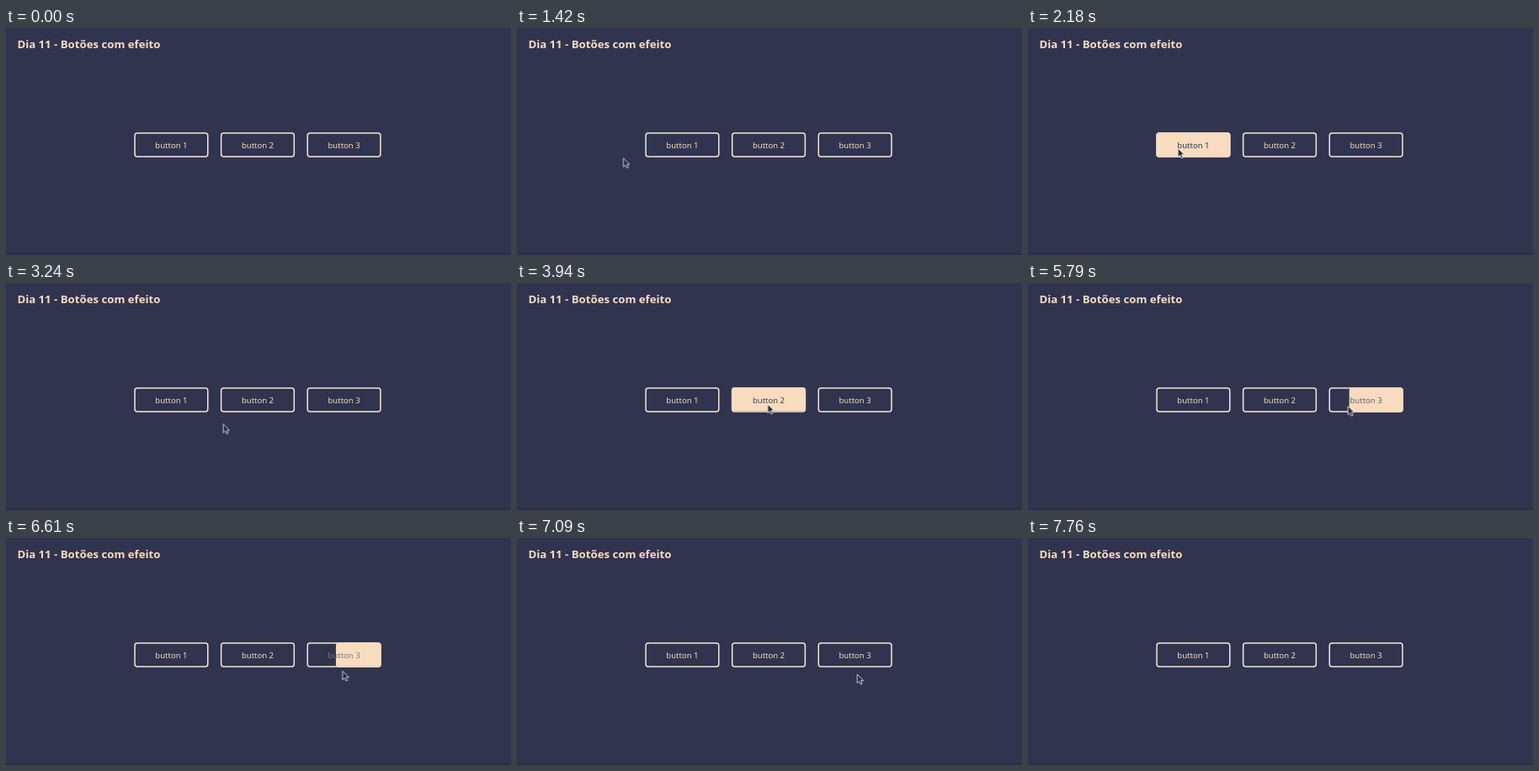
Animation, 600 px wide and 270 px high, one loop 8.03 s. Source, as an HTML page:

```html
<!DOCTYPE html>
<html lang="pt">
<head>
<meta charset="utf-8">
<title>Botões com efeito</title>
<style>
  html, body { margin: 0; width: 100%; height: 100%; overflow: hidden; background: #30344e; }
  svg { display: block; width: 600px; height: 270px; font-family: "Noto Sans", "Open Sans", sans-serif; }
  .title { font-size: 13.2px; font-weight: 700; fill: #f9dcbf; }
  .outline { fill: none; stroke: #f7e6d5; stroke-width: 1.5px; }
  .fill { fill: #f9dcbf; }
  .label { font-size: 9.5px; text-anchor: middle; fill: #f9dcbf; }
  .floor { fill: #2c2e43; }
  #cursor { fill: #2a2b3c; stroke: #e6e2e2; stroke-width: .85px; opacity: 0; }
</style>
</head>
<body>
<svg id="stage" viewBox="0 0 600 270">
  <rect class="floor" y="267.5" width="600" height="2.5"/>
  <text class="title" x="13.4" y="24">Dia 11 - Botões com efeito</text>
</svg>
<script>
const LOOP = 8030, FADE = 500;
const NIGHT = '#30344e', PEACH = '#f9dcbf';
const WIDTH = 88.2, HEIGHT = 29.4, TOP = 124.3, FIRST = 152.3, GAP = 102.6, EDGE = 1.5;
const stage = document.getElementById('stage');

function add(name, attributes, text = '') {
  const el = document.createElementNS('http://www.w3.org/2000/svg', name);
  for (const key in attributes) el.setAttribute(key, attributes[key]);
  el.textContent = text;
  stage.append(el);
  return el;
}

// Each step: [time in ms, style, easing towards the next step]
function play(el, steps) {
  const frames = steps.map(([time, style, easing = 'linear']) => ({ ...style, easing, offset: time / LOOP }));
  el.animate(frames, { duration: LOOP, iterations: Infinity });
}

// A hover transition that starts at enter and reverses at leave
function hover(el, { enter, leave }, off, on) {
  play(el, [
    [0, off], [enter, off, 'ease'], [enter + FADE, on],
    [leave, on, 'ease'], [leave + FADE, off], [LOOP, off]
  ]);
}

// Where the fill is while empty: at the left, top or right edge
const buttons = [
  { enter: 1690, leave: 2640, empty: () => ({ width: '0px' }) },
  { enter: 3590, leave: 4700, empty: () => ({ height: '0px' }) },
  { enter: 5575, leave: 6490, empty: x => ({ x: x + WIDTH + 'px', width: '0px' }) }
];

buttons.forEach((button, i) => {
  const x = FIRST + GAP * i;
  add('rect', {
    class: 'outline', x: x + EDGE / 2, y: TOP + EDGE / 2,
    width: WIDTH - EDGE, height: HEIGHT - EDGE, rx: 3
  });
  const fill = add('rect', { class: 'fill', y: TOP, rx: 3.5 });
  const label = add('text', { class: 'label', x: x + WIDTH / 2, y: 142.5 }, `button ${i + 1}`);
  const full = { x: x + 'px', width: WIDTH + 'px', height: HEIGHT + 'px' };
  hover(fill, button, { ...full, ...button.empty(x) }, full);
  hover(label, button, { fill: PEACH }, { fill: NIGHT });
});

// The pointer rests between trips; a trip slows down towards its end and may dip below its line
const trips = [
  { start: 1060, end: 1820, from: [17, 179], to: [178, 143], dip: 0 },
  { start: 2520, end: 4090, from: [178, 143], to: [299, 143], dip: 28 },
  { start: 4550, end: 6050, from: [299, 143], to: [383, 143], dip: 28 },
  { start: 6210, end: 6900, from: [383, 143], to: [404, 162], dip: 0 },
  { start: 7420, end: 7760, from: [404, 162], to: [574, 176], dip: 0 }
];
const SAMPLES = 24;

function sample({ start, end, from, to, dip }) {
  return Array.from({ length: SAMPLES + 1 }, (_, i) => {
    const t = i / SAMPLES, p = Math.sin(t * Math.PI / 2);
    const x = from[0] + (to[0] - from[0]) * p;
    const y = from[1] + (to[1] - from[1]) * p + dip * Math.sin(Math.PI * p);
    return [start + (end - start) * t, { transform: `translate(${x}px, ${y}px)` }];
  });
}

const cursor = add('path', { id: 'cursor', d: 'M.2 .2V10.6L2.6 8.4L4.4 12L6.1 11.2L4.5 7.6H7.7Z' });
play(cursor, trips.flatMap(sample));
play(cursor, [
  [0, { opacity: 0 }, 'step-end'], [trips[0].start, { opacity: 1 }, 'step-end'],
  [trips.at(-1).end, { opacity: 0 }, 'step-end'], [LOOP, { opacity: 0 }]
]);
</script>
</body>
</html>
```
